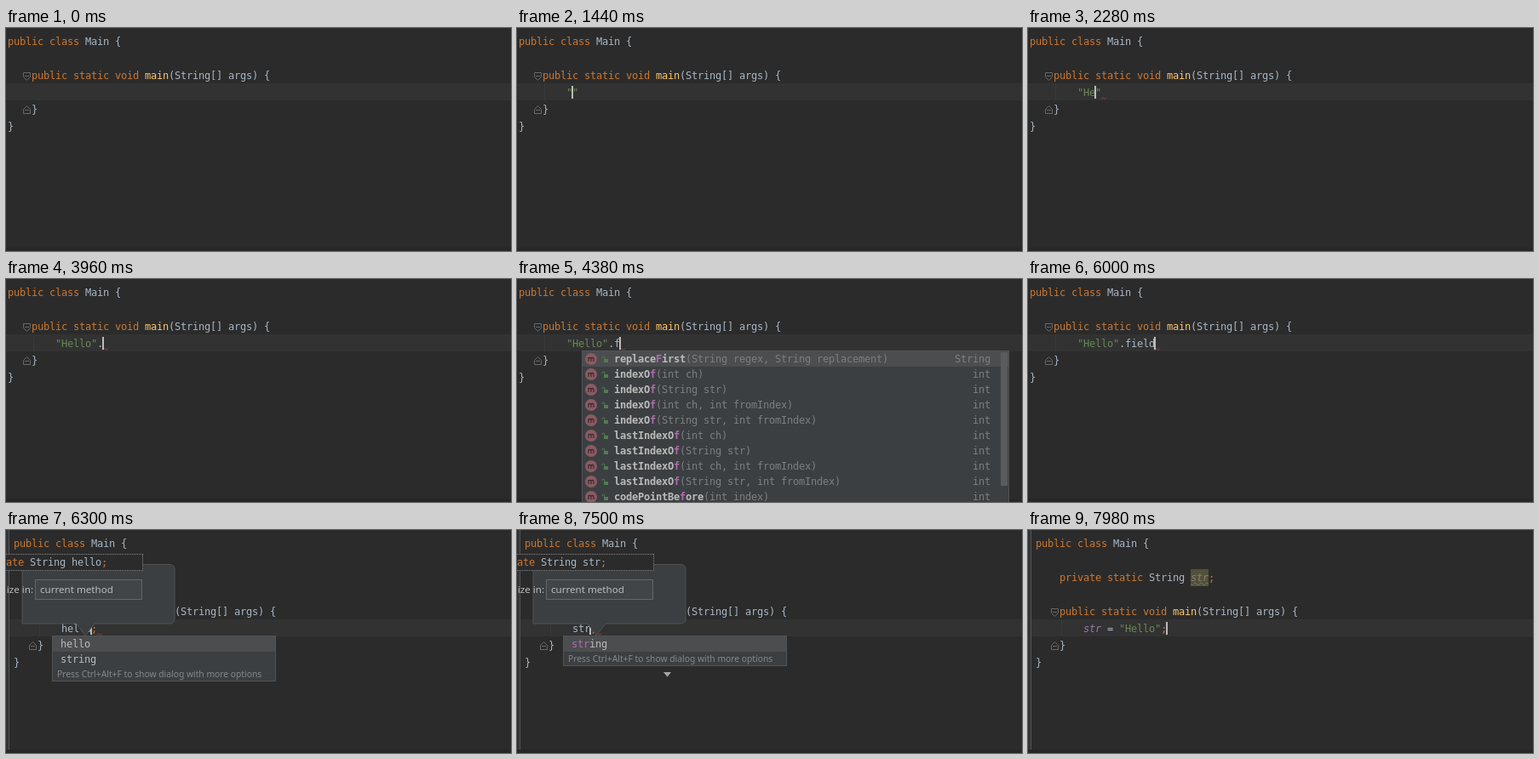
An HTML page that plays this animation: 593 by 262 pixels, repeating every 8 s.

```html
<!DOCTYPE html>
<html lang="en">
<head>
<meta charset="utf-8">
<title>Extract a field in the editor</title>
<style>
  html, body { margin: 0; width: 100%; height: 100%; overflow: hidden; background: #2b2b2b; }
  #stage {
    position: relative; width: 593px; height: 262px; overflow: hidden; background: #2b2b2b;
    font: 12px/20px "DejaVu Sans Mono", monospace; letter-spacing: calc(7px - 1ch);
    color: #a9b7c6; white-space: pre;
  }
  #stage div, #stage svg { position: absolute; }
  svg { overflow: visible; fill: none; }
  .kw { color: #cc7832; }
  .fn { color: #ffc66d; }
  .str { color: #6a8759; }
  .fld { color: #9876aa; font-style: italic; }
  .unused {
    display: inline-block; height: 20px; background: #52503a; color: #85836a;
    font-style: italic; text-decoration: underline wavy #77755c 1px;
  }
  #row { left: 0; width: 100%; height: 20px; background: #323232; }
  #editor { top: 0; width: 600px; height: 262px; }
  #gutter { left: 0; top: 0; width: 3px; height: 262px; background: #313335; border-right: 1px solid #555; }
  #guide { left: 39px; width: 1px; height: 20px; background: #393939; }
  #code { left: 9px; top: 6px; }
  #caret { width: 2px; height: 15px; background: #bbb; }
  #foot { left: 0; top: 258px; width: 100%; height: 4px; background: #272727; }

  .popup { background: #3c3f41; border: 1px solid #515456; box-sizing: border-box; overflow: hidden; }
  .popup .item { left: 0; right: 0; height: 18px; line-height: 18px; color: #bbb; }
  .popup .on { background: #4b4d4f; }
  .popup u { text-decoration: none; color: #b16cb0; }
  #menu { left: 76px; top: 84px; width: 502px; }
  #menu .name { left: 37px; color: #7d7f80; }
  #menu b { color: #bbb; }
  #menu .type { right: 21px; color: #7d7f80; }
  #menu svg { left: 3px; top: 2px; }
  #thumb { left: 491px; top: 1px; width: 8px; background: #595b5d; }
  #names { left: 54px; top: 124px; width: 263px; }
  #names .item { padding-left: 9px; }
  .ui { font-family: "Noto Sans", sans-serif; letter-spacing: 0; }
  #hint { left: 5px; font-size: 10.3px; line-height: 16px; color: #84878a; }

  #balloon { left: 0; top: 0; width: 180px; height: 110px; }
  #decl {
    left: -40px; top: 28px; width: 199px; height: 18px; overflow: hidden;
    background: #2b2b2b; border: 1px dotted #8a8a8a;
  }
  #decl div { left: 11px; top: 0; line-height: 19px; }
  #label { right: 148px; top: 60px; font-size: 11.6px; color: #bbb; }
  #combo {
    left: 34px; top: 58px; width: 124px; height: 22px; line-height: 22px; text-indent: 5px;
    font-size: 11.6px; color: #bbb; background: #414547; border: 1px solid #646668;
  }
</style>
</head>
<body>
<div id="stage">
  <div id="row"></div>
  <div id="editor">
    <div id="gutter"></div>
    <svg id="folds" width="10" height="100" stroke="#686868">
      <path fill="#2b2b2b" d="M-.5 52.5h8v5l-4 4-4-4zM3.5 91.5l4 4v5h-8v-5z"/>
      <path d="M1 56.5h5M1 96.5h5"/>
    </svg>
    <div id="guide"></div>
    <div id="code"></div>
    <svg id="wave" width="7" height="4"><path d="M0 2.5l2-2 2 2 2-2" stroke="#a8403d" stroke-width=".9"/></svg>
    <div id="caret"></div>
  </div>
  <div id="foot"></div>
  <div id="menu" class="popup"></div>
  <div id="balloon">
    <svg width="180" height="110">
      <path d="M-9 20.5H164q6 0 6 6V84q0 6-6 6H76L65 104 55 90H-9z" fill="#3c3f41" stroke="#505355"/>
    </svg>
    <div id="decl"><div></div></div>
    <div id="label" class="ui">Initialize in:</div>
    <div id="combo" class="ui">current method</div>
    <svg width="1" height="1"><path d="M144 67h9l-4.5 5.5z" fill="#a5a8aa"/></svg>
  </div>
  <div id="names" class="popup"></div>
</div>
<script>
const LOOP = 8000;
const $ = id => document.getElementById(id);
const show = (el, on) => { el.style.display = on ? '' : 'none'; };

const MENUS = {
  all: [
    'length()|int', 'isEmpty()|boolean', 'charAt(int index)|char', 'codePointAt(int index)|int',
    'codePointBefore(int index)|int', 'codePointCount(int beginIndex, int endIndex)|int',
    'offsetByCodePoints(int index, int codePointOffset)|int', 'getBytes(String charsetName)|byte[]',
    'getBytes(Charset charset)|byte[]', 'getBytes()|byte[]'
  ],
  f: [
    'replaceFirst(String regex, String replacement)|String',
    ...['indexOf', 'lastIndexOf'].flatMap(name =>
      ['int ch', 'String str', 'int ch, int fromIndex', 'String str, int fromIndex']
        .map(args => `${name}(${args})|int`)),
    'codePointBefore(int index)|int'
  ],
  field: ['field|myField = expr']
};

// Each step changes only the properties it names.
const STEPS = [
  [0, { line: '', caret: null, err: false, menu: null, names: null, prefix: '', field: null, balloon: 0 }],
  [660, { caret: 0 }],
  [1440, { line: '""', caret: 1 }],
  [1740, { err: true }],
  [2040, { line: '"H"', caret: 2 }],
  [2280, { line: '"He"', caret: 3 }],
  [2340, { line: '"Hel"', caret: 4 }],
  [2460, { line: '"Hell"', caret: 5 }],
  [2640, { line: '"Hello"', caret: 6 }],
  [3180, { caret: 7 }],
  [3960, { line: '"Hello".', caret: 8 }],
  [4020, { menu: 'all' }],
  [4320, { line: '"Hello".f', caret: 9 }],
  [4380, { menu: 'f' }],
  [4920, { line: '"Hello".fi', caret: 10 }],
  [5040, { line: '"Hello".fie', caret: 11, menu: 'field' }],
  [5520, { line: '"Hello".fiel', caret: 12 }],
  [5640, { line: '"Hello".field', caret: 13 }],
  [6000, { menu: null }],
  [6060, { line: '"Hello"', caret: 7 }],
  [6120, { line: 'hello;', caret: 5, field: 'private String hello;' }],
  [6180, { balloon: .33 }],
  [6240, { balloon: .66 }],
  [6300, { balloon: 1, names: ['hello', 'string'] }],
  [6960, { caret: null }],
  [7200, { line: 's;', caret: 1, field: 'private String s;' }],
  [7260, { names: ['string'], prefix: 's' }],
  [7380, { line: 'st;', caret: 2, field: 'private String st;', prefix: 'st' }],
  [7500, { line: 'str;', caret: 3, field: 'private String str;', prefix: 'str' }],
  [7800, { line: 'str = "Hello";', caret: 14, err: false, names: null, balloon: .75,
           field: 'private static String str;' }],
  [7860, { balloon: .5 }],
  [7920, { balloon: .25 }],
  [7980, { balloon: 0 }]
];
let last = {};
const states = STEPS.map(([at, change]) => ({ at, ...(last = { ...last, ...change }) }));

const TOKENS = /(?<str>"[^"]*")|(?<kw>\b(?:public|private|class|static|void)\b|;)|(?<fn>\bmain\b)|(?<unused>(?<=static String )str)|(?<fld>\bstr(?= =))/g;
function paint(text) {
  return text.replace(TOKENS, (token, ...rest) => {
    const groups = rest.at(-1);
    const kind = Object.keys(groups).find(key => groups[key]);
    return `<span class="${kind}">${token}</span>`;
  });
}

const ICON = `<svg width="30" height="14">
  <circle cx="7" cy="7" r="7" fill="#8b5a64"/>
  <path d="M4 10V5M4 6.5q1.5-2.2 3 0V10M7 6.5q1.5-2.2 3 0V10" stroke="#33282b" stroke-width="1.1"/>
  <path d="M22 7h5v4h-5z" fill="#4f7d51"/><path d="M23 7V5q-1.5-2.5-3 0v1" stroke="#4f7d51"/>
</svg>`;

function drawMenu(kind) {
  show($('menu'), kind);
  if (!kind) return;
  const rows = MENUS[kind];
  const single = rows.length === 1;
  $('menu').style.height = single ? '20px' : '190px';
  $('menu').innerHTML = rows.map((row, i) => {
    const [label, type] = row.split('|');
    let [, name, args] = label.match(/^(\w+)(.*)$/);
    if (kind === 'f') name = name.replace(/f/i, '<u>$&</u>');
    return `<div class="item ${i ? '' : 'on'}" style="top:${i * 18}px">${single ? '' : ICON}` +
      `<div class="name"><b>${name}</b>${args}</div><div class="type">${type}</div></div>`;
  }).join('') + (single ? '' : `<div id="thumb" style="height:${kind === 'f' ? 157 : 60}px"></div>`);
}

function drawNames(names, prefix) {
  show($('names'), names);
  if (!names) return;
  const end = names.length * 18;
  $('names').style.height = end + 18 + 'px';
  $('names').innerHTML = names.map((name, i) =>
    `<div class="item ${i ? '' : 'on'}" style="top:${i * 18}px"><u>${prefix}</u>${name.slice(prefix.length)}</div>`
  ).join('') + `<div id="hint" class="ui" style="top:${end}px">Press Ctrl+Alt+F to show dialog with more options</div>`;
}

function draw(s) {
  const drop = s.field ? 40 : 0;
  const top = 65 + drop;
  const rows = ['public class Main {', ''];
  if (s.field) rows.push('    ' + s.field, '');
  rows.push('    public static void main(String[] args) {', '        ' + s.line, '    }', '}');
  $('code').innerHTML = rows.map(paint).join('\n');

  $('editor').style.left = s.field ? '0' : '-7px';
  $('folds').style.top = drop + 'px';
  $('row').style.top = $('guide').style.top = top + 'px';
  show($('guide'), s.line);
  show($('caret'), s.caret !== null);
  $('caret').style.cssText += `;left:${64 + 7 * s.caret}px;top:${top + 3}px`;
  show($('wave'), s.err);
  $('wave').style.cssText += `;left:${65 + 7 * s.line.length}px;top:${top + 16}px`;

  drawMenu(s.menu);
  drawNames(s.names, s.prefix);
  $('balloon').style.opacity = s.balloon;
  $('decl').firstChild.innerHTML = paint((s.field || '').replace('static ', ''));
}

let shown;
function tick() {
  const t = performance.now() % LOOP;
  const state = states.findLast(s => s.at <= t);
  if (state !== shown) draw(shown = state);
  requestAnimationFrame(tick);
}
tick();
</script>
</body>
</html>
```
